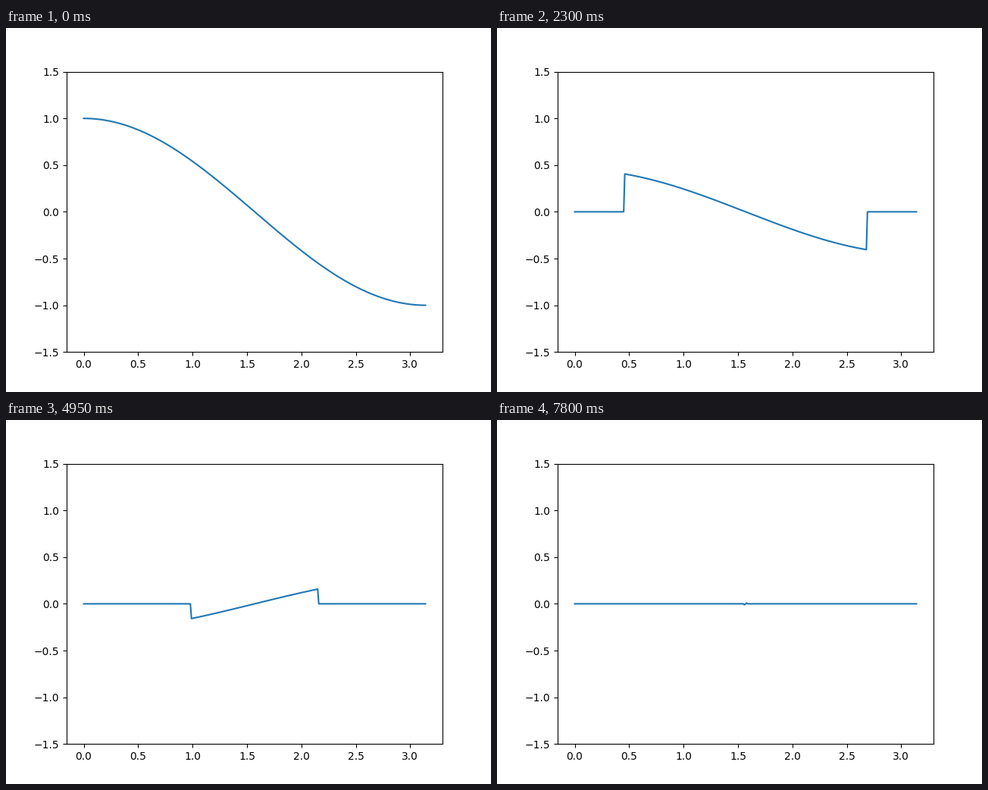
A matplotlib script for the animation above (7.85 s loop, 640 by 480 pixels).

```python
import numpy as np
import matplotlib.pyplot as plt
from matplotlib.animation import FuncAnimation

STEP = 0.01
FRAMES = 157
INTERVAL = 50

x = np.arange(0, np.pi, STEP)


def wave(t):
    """Cosine profile inside the shrinking span [t, pi - t], zero outside."""
    inside = (x >= t) & (x <= np.pi - t)
    return np.where(inside, np.cos(x) * (np.cos(t) - np.sin(t)), 0.0)


fig, ax = plt.subplots(figsize=(6.4, 4.8), dpi=100)
line, = ax.plot(x, wave(0))
ax.set_ylim(-1.5, 1.5)


def update(i):
    line.set_ydata(wave(i * STEP))
    return line,


anim = FuncAnimation(fig, update, frames=FRAMES, interval=INTERVAL,
                     repeat=True, repeat_delay=0)
plt.show()
```
